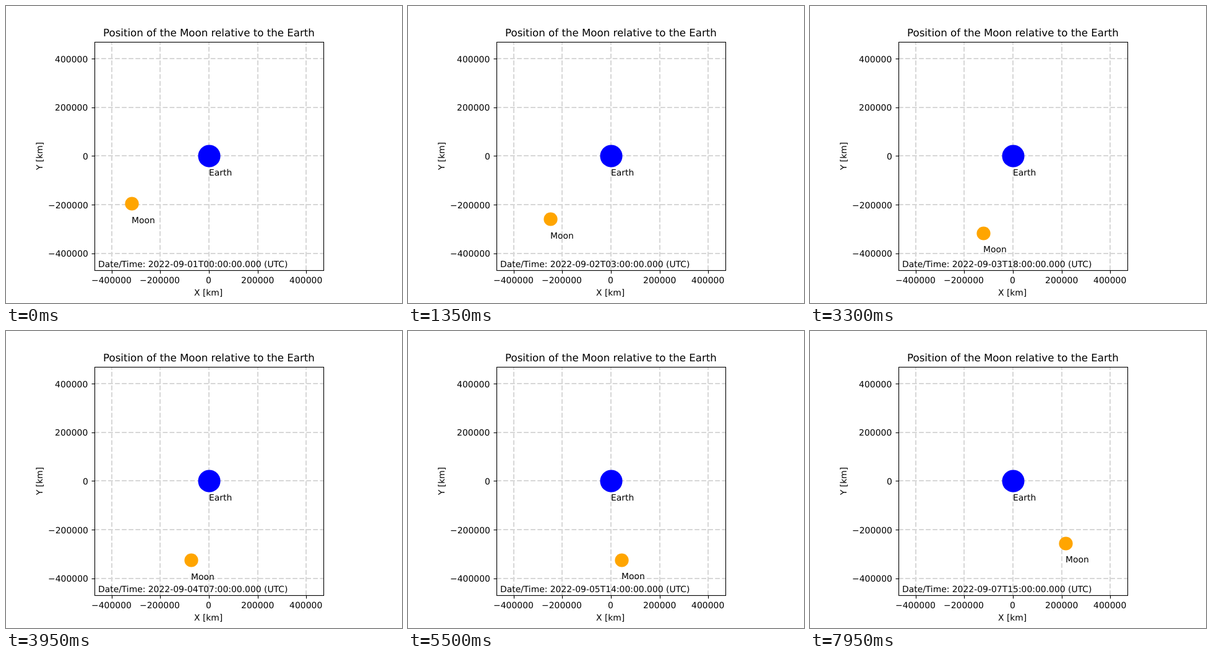
An HTML page with a canvas for the animation above (8000 ms loop, 640x480 px).

```html
<!DOCTYPE html>
<html lang="en">
<head>
<meta charset="utf-8">
<title>Position of the Moon</title>
<style>
  html, body { margin: 0; width: 100%; height: 100%; overflow: hidden; background: #fff; }
  canvas { display: block; }
</style>
</head>
<body>
<canvas id="stage" width="640" height="480"></canvas>
<script>
const ctx = document.getElementById('stage').getContext('2d');

const STEP = 50, STEPS = 160;              // one step is one hour
const CX = 328, CY = 242.4, HALF = 184.8;  // plot centre and half size
const SCALE = HALF / 470000;               // pixels per km
const PT = 100 / 72;
const LABEL_DROP = 80000;                  // km below a body
const LEFT = 143.5, RIGHT = 513.5, TOP = 58.5, BOTTOM = 427.5;

const px = km => CX + km * SCALE;
const py = km => CY - km * SCALE;

// Key points of the orbit in km, one every 40 hours
const KEY_HOURS = 40;
const PATH_X = [-318550, -210805, -70476, 81282, 219606];
const PATH_Y = [-195670, -283033, -326013, -315881, -252699];

// Smooth polynomial through evenly spaced values (Newton's forward differences)
function curve(values, s) {
  let row = values, weight = 1, sum = 0;
  for (let k = 0; row.length; k++) {
    sum += weight * row[0];
    weight *= (s - k) / (k + 1);
    row = row.slice(1).map((v, i) => v - row[i]);
  }
  return sum;
}

// Text set glyph by glyph: advances round to 1/8 px, the start to a whole pixel
function text(str, x, y, align = 0, size = 10) {
  ctx.font = `${size * PT}px "DejaVu Sans", sans-serif`;
  ctx.textRendering = 'geometricPrecision';
  ctx.fillStyle = '#000';
  const width = s => ctx.measureText(s).width;
  const offsets = [0];
  for (let i = 0; i < str.length; i++) {
    const a = str[i], b = str[i + 1] || '';
    const kern = width(a + b) - width(a) - width(b);
    offsets.push(offsets[i] + Math.round(width(a) * 8) / 8 + kern);
  }
  const start = Math.round(x - align * (offsets[str.length] + 0.9));
  [...str].forEach((ch, i) => ctx.fillText(ch, start + offsets[i], y));
}

function line(x1, y1, x2, y2) {
  ctx.beginPath();
  ctx.moveTo(x1, y1);
  ctx.lineTo(x2, y2);
  ctx.stroke();
}

function eachTick(fn) {
  for (let v = -400000; v <= 400000; v += 200000) fn(v, Math.round(px(v)), Math.round(py(v)));
}

function body(name, x, y, radius, color) {
  ctx.fillStyle = color;
  ctx.beginPath();
  ctx.arc(Math.round(px(x)) + 0.5, Math.round(py(y)) + 0.5, radius, 0, 2 * Math.PI);
  ctx.fill();
  text(name, px(x), Math.round(py(y - LABEL_DROP)));
}

function grid() {
  ctx.strokeStyle = '#d7d7d7';
  ctx.lineWidth = 1.5 * PT;
  ctx.setLineDash([5.55 * PT, 2.4 * PT]);
  eachTick((v, x, y) => {
    line(x, 427, x, 58);
    line(143, y, 513, y);
  });
  ctx.setLineDash([]);
}

function axes() {
  ctx.strokeStyle = '#000';
  ctx.lineWidth = 0.8 * PT;
  ctx.strokeRect(LEFT, TOP, RIGHT - LEFT, BOTTOM - TOP);
  eachTick((v, x, y) => {
    const label = String(v).replace('-', '\u2212');
    line(x + 0.5, BOTTOM, x + 0.5, BOTTOM + 5);
    line(LEFT, y + 0.5, LEFT - 5, y + 0.5);
    text(label, px(v), 448, 0.5);
    text(label, 133.5, Math.round(py(v) + 5.5), 1);
  });
  text('X [km]', CX, 468, 0.5);
  ctx.save();
  ctx.translate(59, 242);
  ctx.rotate(-Math.PI / 2);
  text('Y [km]', 0, 0, 0.5);
  ctx.restore();
  text('Position of the Moon relative to the Earth', CX, 49, 0.5, 12);
}

function draw(hour) {
  const s = hour / KEY_HOURS;
  ctx.fillStyle = '#fff';
  ctx.fillRect(0, 0, 640, 480);
  grid();
  body('Earth', 0, 0, 13 * PT, '#0000ff');
  body('Moon', curve(PATH_X, s), curve(PATH_Y, s), 8 * PT, '#ffa500');
  axes();
  const stamp = new Date(Date.UTC(2022, 8, 1, hour)).toISOString().slice(0, -1);
  text(`Date/Time: ${stamp} (UTC)`, 149, 422);
}

function tick() {
  draw(Math.floor(performance.now() / STEP + 0.001) % STEPS);
  requestAnimationFrame(tick);
}
tick();
</script>
</body>
</html>
```
